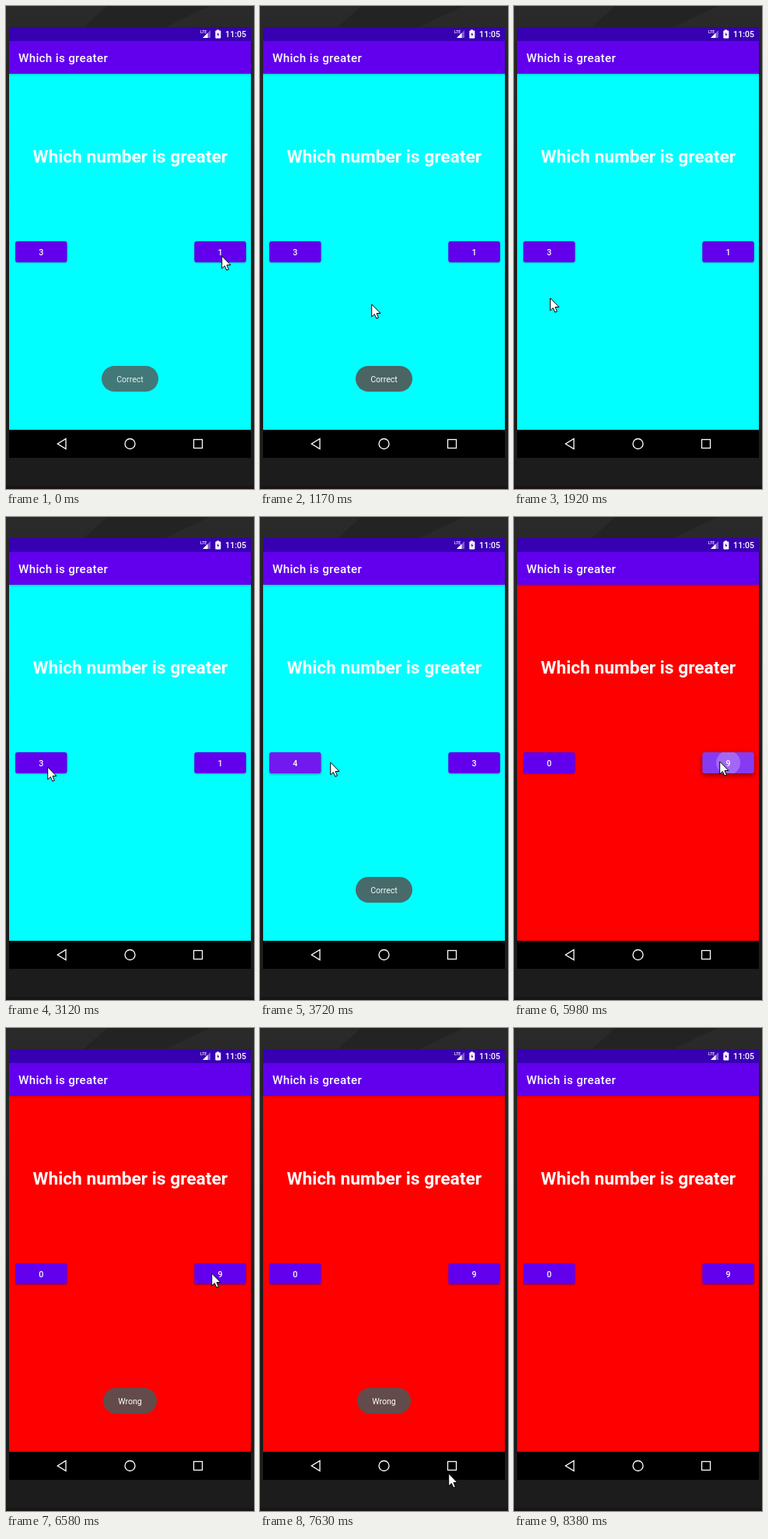
An HTML page with a canvas that plays this animation: 319 px wide and 620 px high, repeating every 8910 ms.

```html
<!DOCTYPE html>
<html lang="en">
<head>
<meta charset="utf-8">
<title>Which is greater</title>
<style>
  html, body { margin: 0; width: 100%; height: 100%; overflow: hidden; background: #1c1c1c; }
  canvas { display: block; width: 319px; height: 620px; }
</style>
</head>
<body>
<canvas id="stage"></canvas>
<script>
const W = 319, H = 620, LOOP = 8910;
const STEP = 119.5; // the screen refreshes in even steps
const BUTTON = { left: 12, right: 242.3, y: 302, w: 66.5, h: 27 };

const canvas = document.getElementById('stage');
const ctx = canvas.getContext('2d');
const ratio = window.devicePixelRatio || 1;
canvas.width = W * ratio;
canvas.height = H * ratio;

// Each click brings new numbers, a ripple on the clicked button and a toast.
const ROUNDS = [
  { at: -450, left: 3, right: 1, color: '#00ffff', message: 'Correct' },
  { at: 3220, clicked: 'left', left: 4, right: 3, color: '#00ffff', message: 'Correct' },
  { at: 5940, clicked: 'right', left: 0, right: 9, color: '#ff0000', message: 'Wrong' }
];

// Main turns of the pointer's path: time, x, y
const PATH = [
  [0, 277, 320], [240, 277, 320], [870, 153, 391], [1290, 132, 372], [1910, 46, 374],
  [2200, 100, 312], [2460, 77, 347], [2730, 53, 320], [3450, 53, 320], [3700, 89, 314],
  [4200, 165, 352], [4690, 280, 320], [5250, 264, 313], [6750, 264, 314],
  [7090, 216, 515], [7270, 216, 515], [7520, 242, 570], [8000, 251, 624]
];

const clamp = v => Math.max(0, Math.min(1, v));
const ramp = (t, start, duration) => clamp((t - start) / duration);

function pointerAt(t) {
  const i = PATH.findIndex(p => p[0] > t);
  if (i < 0) return PATH[PATH.length - 1].slice(1);
  const [t0, x0, y0] = PATH[i - 1], [t1, x1, y1] = PATH[i];
  const k = ramp(t, t0, t1 - t0);
  return [Math.round(x0 + (x1 - x0) * k), Math.round(y0 + (y1 - y0) * k)];
}

function rect(x, y, w, h, fill) {
  ctx.fillStyle = fill;
  ctx.fillRect(x, y, w, h);
}

function roundRect(x, y, w, h, r, fill) {
  ctx.beginPath();
  ctx.roundRect(x, y, w, h, r);
  ctx.fillStyle = fill;
  ctx.fill();
}

function circle(x, y, r) {
  ctx.beginPath();
  ctx.arc(x, y, r, 0, 2 * Math.PI);
}

function polygon(points, fill) {
  ctx.beginPath();
  points.forEach(([x, y]) => ctx.lineTo(x, y));
  ctx.closePath();
  if (fill) {
    ctx.fillStyle = fill;
    ctx.fill();
  }
}

function text(str, x, y, size, weight = 400, align = 'left', spacing = 0) {
  ctx.font = `${weight} ${size}px Roboto, sans-serif`;
  ctx.letterSpacing = spacing + 'px';
  ctx.textAlign = align;
  ctx.fillStyle = '#fff';
  ctx.fillText(str, x, y);
}

function shadow(alpha, blur, dy) {
  ctx.shadowColor = `rgba(0,0,0,${alpha})`;
  ctx.shadowBlur = blur * ratio;
  ctx.shadowOffsetY = dy * ratio;
}

function drawSurround() {
  const fade = ctx.createLinearGradient(0, 0, 0, H);
  fade.addColorStop(0, '#2a2a2a');
  fade.addColorStop(.6, '#1c1c1c');
  rect(0, 0, W, H, fade);
  polygon([[130, 0], [262, 0], [205, 27], [100, 27]], '#232323');
  rect(0, 616, W, 4, '#1a1415');
}

function drawStatusBar() {
  rect(4, 27, 311, 18, '#3700b3');
  text('LTE', 250, 35, 5, 500);
  polygon([[263, 31], [263, 41], [253, 41]], 'rgba(255,255,255,.35)');
  polygon([[259.5, 34.5], [259.5, 41], [253, 41]], '#fff');
  rect(271, 30.5, 3, 2, '#fff');
  roundRect(269.3, 31.5, 7, 10, 1, '#fff');
  polygon([[273.2, 33.5], [271.3, 37], [272.6, 37], [272.4, 39.5], [274.3, 36], [273, 36]], '#3700b3');
  text('11:05', 309, 40, 10.6, 500, 'right');
}

function drawAppBar() {
  shadow(.3, 3, .5);
  rect(4, 45, 311, 42, '#6200ee');
  shadow(0, 0, 0);
  text('Which is greater', 16, 72, 15.14, 500, 'left', .34);
}

function drawNavBar() {
  rect(4, 544, 311, 36, '#000');
  ctx.strokeStyle = '#fff';
  ctx.lineWidth = 1.3;
  polygon([[77, 555.5], [77, 568.5], [66.3, 562]]);
  ctx.stroke();
  circle(159.5, 562, 6.5);
  ctx.stroke();
  ctx.strokeRect(241.5, 556.5, 11, 11);
}

function drawButton(side, round, t) {
  const x = BUTTON[side], { y, w, h } = BUTTON;
  const age = round.clicked === side ? t - round.at + 80 : Infinity;
  const glow = 1 - ramp(age, 250, 400);
  shadow(.32 + .1 * glow, 2 + 4 * glow, .8 + 2 * glow);
  roundRect(x, y, w, h, 3, '#6200ee');
  shadow(0, 0, 0);
  if (glow > 0) {
    const light = `rgba(255,255,255,${.23 * glow})`;
    ctx.save();
    roundRect(x, y, w, h, 3, light);
    ctx.clip();
    circle(x + w / 2, y + h / 2, 4 + age * .1);
    ctx.fillStyle = light;
    ctx.fill();
    ctx.restore();
  }
  text(round[side], x + w / 2, 319.6, 10.6, 500, 'center');
}

function drawToast({ at, message }, t) {
  const start = at + 100;
  const alpha = ramp(t, start, 400) - ramp(t, start + 1900, 350);
  if (alpha <= 0) return;
  const width = message === 'Correct' ? 73 : 69;
  ctx.globalAlpha = alpha;
  roundRect(159.5 - width / 2, 462, width, 33, 16.5, 'rgba(84,84,84,.9)');
  text(message, 159.5, 483, 10.6, 400, 'center');
  ctx.globalAlpha = 1;
}

function drawPointer([x, y]) {
  ctx.save();
  ctx.translate(x, y);
  polygon([[.7, 1], [.7, 16.9], [4.3, 13.6], [6.8, 19.2], [9.4, 18.1], [7, 12.6], [11.9, 12.4]], '#fff');
  ctx.strokeStyle = '#000';
  ctx.lineWidth = 1;
  ctx.stroke();
  ctx.restore();
}

function draw(t) {
  const round = ROUNDS.filter(r => r.at <= t).pop();
  ctx.setTransform(ratio, 0, 0, ratio, 0, 0);
  drawSurround();
  rect(4, 87, 311, 457, round.color);
  drawAppBar();
  drawStatusBar();
  text('Which number is greater', 159.8, 201, 22.75, 700, 'center');
  drawButton('left', round, t);
  drawButton('right', round, t);
  ROUNDS.forEach(r => drawToast(r, t));
  drawNavBar();
  drawPointer(pointerAt(t));
}

const begin = performance.now();
function tick() {
  const t = (performance.now() - begin) % LOOP;
  draw(Math.floor(t / STEP) * STEP);
  requestAnimationFrame(tick);
}
tick();
</script>
</body>
</html>
```
